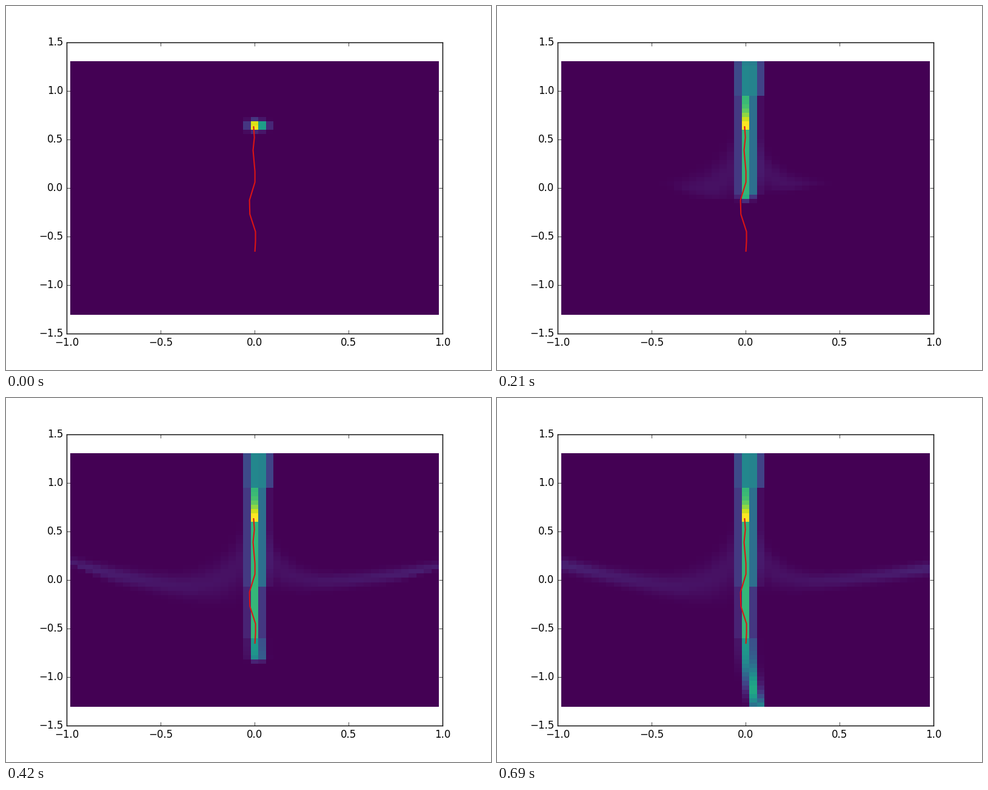
Write a matplotlib script that moves like this. It is 800 px wide and 600 px high and loops after 0.72 s.

```python
import matplotlib.pyplot as plt
import numpy as np
from matplotlib.animation import FuncAnimation

FRAMES, INTERVAL = 24, 30
ROWS, COLS, MID = 59, 49, 24
SOURCE = 15                      # last row of the bright start cell
TOP, ROW_H = 91.4, 417.2 / 59    # pixels

plt.style.use("classic")
plt.rcParams.update({"font.family": "DejaVu Sans", "figure.facecolor": "white"})

rows = np.arange(ROWS)
cells = np.arange(COLS) - MID
row_y = TOP + ROW_H * (rows + 0.5)


def soft_step(x, width):
    return 1 / (1 + np.exp(-np.clip(x / width, -50, 50)))


def make_beam():
    """A bell-shaped beam in four sections; the last one drifts right."""
    section = np.searchsorted([8, 31, 43], rows, side="right")
    centre = np.array([0.45, 0.20, 0.07, 0.25])[section]
    width = np.array([1.15, 0.71, 0.55, 0.57])[section]
    power = np.array([0.50, 0.69, 0.67, 0.60])[section]
    centre = centre + 1.3 * (np.maximum(rows - 43, 0) / 15) ** 2

    off = (cells - centre[:, None]) / width[:, None]
    grid = power[:, None] * np.exp(-off ** 2 / 2)
    grid[:, (cells < -1) | (cells > 2)] = 0
    glow = 0.36 * np.exp(-((SOURCE - rows) / 3.5) ** 2)
    grid[:, MID] += np.where(rows <= SOURCE, glow, 0)
    return grid


def make_wings():
    """Wing strengths and the time at which each cell lights up."""
    s = np.abs(cells) / MID
    left = cells < 0
    trough, rise, reach = (np.where(left, a, b)
                           for a, b in ((312, 304), (36, 22), (0.25, 0.15)))
    outer = np.maximum(s - 0.35, 0) / 0.65
    centre = trough - rise * outer ** 1.3 - 90 * np.exp(-s / 0.1)
    spread = 7 + 32 * np.exp(-s / reach)
    power = np.where((cells > -2) & (cells < 2), 0, 0.045 + 0.05 * s ** 2)

    off = (row_y[:, None] - centre) / spread
    arrival = 4 + (np.abs(cells) - 2) / 2.45 + 1.1 * np.maximum(off + 1, 0)
    return power * np.exp(-off ** 2 / 2), arrival


beam = make_beam()
wings, arrival = make_wings()


def field(t):
    upper, lower = SOURCE - 1 - 2 * t, SOURCE + 2.29 * t
    front = (soft_step(rows - upper + 0.65, 0.22)
             * soft_step(lower + 0.65 - rows, 0.22))
    grid = beam + wings * soft_step(t - arrival + 0.15, 0.3)
    # The start cell first spills to the right
    grid[SOURCE - 1:SOURCE + 1, MID + 1:MID + 3] += np.exp(-t) * np.array([0.22, 0.09])
    return grid * front[:, None]


fig = plt.figure(figsize=(8, 6), dpi=100)
ax = fig.add_axes([0.125, 0.1, 0.775, 0.8])
half = ROWS * ROW_H / 320
shift = -0.35 / 310              # keeps cell edges on whole pixels
image = ax.imshow(field(0), extent=(shift - 0.98, shift + 0.98, -half, half),
                  vmin=0, vmax=1, cmap="viridis", interpolation="nearest",
                  aspect="auto")

track_x = [-.005, -.001, -.008, .002, .002, -.027, -.025, .005, .005, .002]
track_y = [.63, .52, .39, .17, .06, -.125, -.27, -.45, -.55, -.65]
ax.plot(track_x, track_y, color="#dc1414", lw=1.5)

ax.set_xlim(-1, 1)
ax.set_ylim(-1.5, 1.5)
ax.set_xticks(np.arange(-1, 1.1, 0.5))
ax.set_yticks(np.arange(-1.5, 1.6, 0.5))


def update(frame):
    image.set_data(field(frame))
    return [image]


anim = FuncAnimation(fig, update, frames=FRAMES, interval=INTERVAL,
                     repeat=True, repeat_delay=0)
plt.show()
```
